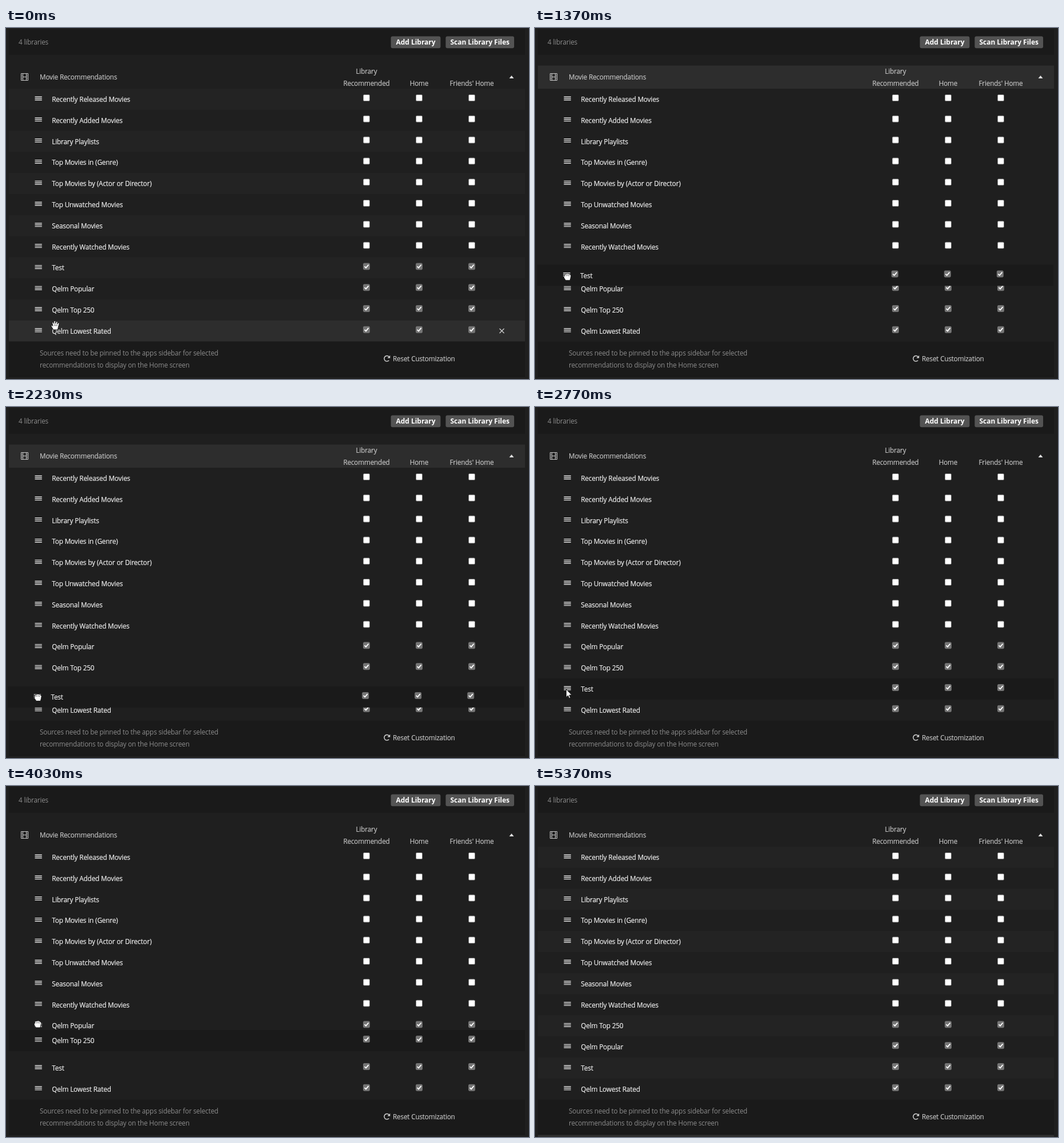
An HTML page that plays this animation: 914 by 613 pixels, repeating every 6.76 s.

```html
<!DOCTYPE html>
<html lang="en">
<head>
<meta charset="utf-8">
<title>Library settings</title>
<style>
html, body { margin: 0; width: 100%; height: 100%; overflow: hidden; background: #1f1f1f; }
svg { display: block; width: 914px; height: 613px; }
text { font: 11.7px "Open Sans", "Noto Sans", sans-serif; letter-spacing: -.15px; fill: #f0f0f0; }
#rows text { letter-spacing: -.11px; stroke: #f0f0f0; stroke-width: .2px; }
.dim { fill: #8c8c8c; }
.label { fill: #c8c8c8; stroke: #c8c8c8; stroke-width: .15px; }
.mid { text-anchor: middle; }
.bold { font-size: 11.96px; font-weight: 700; letter-spacing: 0; fill: #fff; }
</style>
</head>
<body>
<svg id="stage" viewBox="0 0 914 613" xmlns="http://www.w3.org/2000/svg">
  <rect width="914" height="613" fill="#1f1f1f"/>
  <rect x="5" y="2" width="902" height="45" fill="#1a1a1a"/>
  <text class="dim" x="22" y="29.3">4 libraries</text>
  <rect x="672.6" y="14.6" width="86.8" height="20.6" rx="3" fill="#535353"/>
  <text class="bold mid" x="716" y="29.3">Add Library</text>
  <rect x="768.4" y="14.6" width="119.6" height="20.6" rx="3" fill="#535353"/>
  <text class="bold mid" x="828.2" y="29.3">Scan Library Files</text>

  <rect id="head" x="5" y="65.5" width="902" height="40.5" fill="#2d2d2d"/>
  <g fill="none" stroke="#c8c8c8">
    <path d="M26.5 79.5h12v12h-12zM29.5 79.5v12M35.5 79.5v12M29.5 85.5h6"/>
    <path d="M26.5 82.5h3M26.5 85.5h3M26.5 88.5h3M35.5 82.5h3M35.5 85.5h3M35.5 88.5h3" stroke-width=".6"/>
  </g>
  <text class="label" x="59" y="90.2">Movie Recommendations</text>
  <text class="label mid" x="630" y="80.2">Library</text>
  <text class="label mid" x="630" y="100.5">Recommended</text>
  <text class="label mid" x="722" y="100.5">Home</text>
  <text class="label mid" x="814" y="100.5">Friends' Home</text>
  <path d="M879.5 88l4-5 4 5z" fill="#ddd"/>

  <g id="stripes" fill="#232323"></g>
  <g id="rows"></g>

  <rect x="5" y="547.6" width="902" height="60.4" fill="#1a1a1a"/>
  <text class="dim" x="59" y="571.5">Sources need to be pinned to the apps sidebar for selected</text>
  <text class="dim" x="59" y="592.5">recommendations to display on the Home screen</text>
  <path d="M669.3 580.6a4.8 4.8 0 1 1 .3-6.2" fill="none" stroke="#d0d0d0" stroke-width="1.5"/>
  <path d="M671.3 571.8v4.8h-4.8z" fill="#d0d0d0"/>
  <text class="label" x="676" y="581.5">Reset Customization</text>
  <rect id="next" x="5" y="608" width="902" height="5" fill="#2d2d2d"/>
  <rect x="5" y="607.7" width="902" height="1.3" fill="#161616"/>

  <g id="cursor" stroke="#111" stroke-width=".9" stroke-linejoin="round" fill="#fff">
    <path id="arrow" d="M0 0v14l3.2-3 2 4.8 2.2-1-2-4.6h4.4z"/>
    <path id="point" d="M-1.6 .8q0-1.8 1.6-1.8t1.6 1.8v5q2-.8 2.7.6 2-.6 2.6.8 2.3-.4 2.3 1.8v3.2l-1.4 4.8h-7.6l-3.7-5.2q-1.6-2.4-.4-3 1.1-.4 2.3 1.4z"/>
    <g id="grab">
      <path d="M-3.2 8l-3.3-5.4q-1.2-2.2.2-2.6 1-.2 2.2 1.6l-1-5.2q-.2-1.5 1-1.6 1.1 0 1.5 1.4l.5 1.2-.1-3.6q0-1.6 1.3-1.6t1.3 1.6l.3 3.4.8-2.6q.4-1.4 1.6-1.1 1.1.3.9 1.7l-.4 3 1-1.6q.7-1.1 1.7-.6t.6 1.8l-1.6 5.6-.8 4.6z"/>
      <path d="M-1.5-1.5l.4 3M1-1.5v3M3.4-.8l-.5 2.3" fill="none" stroke-width=".7"/>
    </g>
    <g id="fist">
      <path d="M-3.2 5.5l-2.8-4.3q-1-2.6.7-3.2l.3-2.8q.8-1.6 2.3-.6.8-1.5 2.4-.8 1.5-1 2.4.4 2-.6 2.5 1.4 1.6.2 1.5 2.2l-.8 4-1 3.7z"/>
      <path d="M-2.5-4.4v2.4M.2-4.8v2.6M2.6-4.2v2.3" fill="none" stroke-width=".7"/>
    </g>
  </g>
</svg>
<script>
const LOOP = 6760, TOP = 106, STEP = 36.8;
const $ = id => document.getElementById(id);

function add(parent, tag, attrs, text) {
  const el = document.createElementNS("http://www.w3.org/2000/svg", tag);
  for (const k in attrs) el.setAttribute(k, attrs[k]);
  if (text) el.textContent = text;
  parent.append(el);
  return el;
}
const show = (el, on) => el.setAttribute("opacity", on ? 1 : 0);
const clamp = v => Math.min(1, Math.max(0, v));

// Row contents are laid out relative to the top edge of the row.
function makeRow(name, checked) {
  const g = add($("rows"), "g", {});
  const bg = add(g, "rect", { x: 5, width: 902, height: STEP, fill: "none" });
  add(g, "path", { d: "M50.5 14.2h12.3M50.5 17h12.3M50.5 19.8h12.3", stroke: "#e0e0e0", "stroke-width": 1.4 });
  add(g, "text", { x: 80.2, y: 23.1 }, name);
  for (const x of [630, 722, 814]) {
    add(g, "rect", { x: x - 5.5, y: 10.5, width: 11, height: 11, rx: 1.6,
      fill: checked ? "#757575" : "#fff", stroke: "#767676", "stroke-width": .9 });
    if (checked) add(g, "path", { d: `M${x - 3.4} 16l2.4 2.5 4.6-5.4`, fill: "none", stroke: "#fff", "stroke-width": 1.8 });
  }
  const close = add(g, "path", { d: "M862.5 14.2l8 8M870.5 14.2l-8 8", stroke: "#d0d0d0", "stroke-width": 1.3, opacity: 0 });
  return { g, bg, close };
}

for (let i = 0; i < 12; i += 2)
  add($("stripes"), "rect", { x: 5, y: TOP + i * STEP, width: 902, height: STEP });

["Recently Released Movies", "Recently Added Movies", "Library Playlists", "Top Movies in (Genre)",
 "Top Movies by (Actor or Director)", "Top Unwatched Movies", "Seasonal Movies", "Recently Watched Movies"]
  .forEach((name, i) => makeRow(name, false).g.setAttribute("transform", `translate(0 ${TOP + i * STEP})`));

// Keys are [time, value, ...]; values move evenly between them.
function track(keys, t, i = 1) {
  if (t <= keys[0][0]) return keys[0][i];
  for (let k = 1; k < keys.length; k++) {
    const a = keys[k - 1], b = keys[k];
    if (t < b[0]) return a[i] + (b[i] - a[i]) * (t - a[0]) / (b[0] - a[0]);
  }
  return keys[keys.length - 1][i];
}
function ease(t, start, end) {
  const p = clamp((t - start) / (end - start));
  return p * p * (3 - 2 * p);
}

const testY = [[1130, 0], [1250, 2], [1670, 40.6], [1800, 52], [2150, 84], [2400, 95], [2600, 95], [2740, 2 * STEP]];
const testX = [[1130, 0], [1500, -1.8], [2600, -1.8], [2740, 0]];
const topY = [[3530, STEP], [3750, 35], [4030, 25.8], [4200, 5], [4670, 5], [4790, 0]];
const items = [
  { ...makeRow("Test", true), x: t => track(testX, t), y: t => track(testY, t) },
  { ...makeRow("Qelm Popular", true), y: t => STEP * (1 - ease(t, 1380, 1620) + ease(t, 4040, 4330)) },
  { ...makeRow("Qelm Top 250", true), y: t => t < 3530 ? STEP * (2 - ease(t, 1840, 2140)) : track(topY, t) },
  { ...makeRow("Qelm Lowest Rated", true), y: () => 3 * STEP }
];
const drags = [
  { item: items[0], from: 1130, drop: 2600 },
  { item: items[2], from: 3530, drop: 4670 }
];
const SETTLE = 230;

const path = [[0, 86, 519], [29.9, 86, 519], [30, 97, 519], [200, 97, 519], [500, 71, 480], [700, 51, 436],
  [830, 57, 417], [1130, 57, 417], [1300, 57, 424], [1670, 56, 483], [1800, 56, 490], [2400, 56, 515],
  [2600, 56, 512], [2770, 54.5, 493], [3270, 55, 440], [3530, 55, 440], [3700, 55, 435], [4030, 55.5, 416.5],
  [4200, 55.5, 415], [4670, 55.3, 414.7], [4850, 54, 428], [5330, 33, 608]];

function draw(t) {
  const x = track(path, t, 1), y = track(path, t, 2);
  const active = drags.find(d => t >= d.from && t < d.drop + SETTLE);
  const held = active && t < active.drop;
  const base = TOP + 8 * STEP;

  show($("stripes"), !active);
  $("head").setAttribute("opacity", t < 1130 ? 0 : 1 - clamp((t - 2600) / 150));
  show($("next"), t >= 5320);

  let over = false;
  for (const it of items) {
    const top = base + it.y(t);
    const hover = !active && t < 5370 && y >= top && y < top + STEP;
    over = over || hover;
    it.g.setAttribute("transform", `translate(${it.x ? it.x(t) : 0} ${top})`);
    it.bg.setAttribute("fill", active && active.item === it ? "#1a1a1a" : hover ? "#2d2d2d" : "none");
    show(it.close, hover);
  }
  if (active && $("rows").lastChild !== active.item.g) $("rows").append(active.item.g);

  const kind = held ? "fist" : !over ? "arrow" : x < 70 ? "point" : "grab";
  for (const id of ["arrow", "point", "grab", "fist"]) show($(id), id === kind);
  show($("cursor"), t < 5370);
  $("cursor").setAttribute("transform", `translate(${x} ${y})`);
}

const begin = performance.now();
function tick() {
  draw((performance.now() - begin) % LOOP);
  requestAnimationFrame(tick);
}
tick();
</script>
</body>
</html>
```
